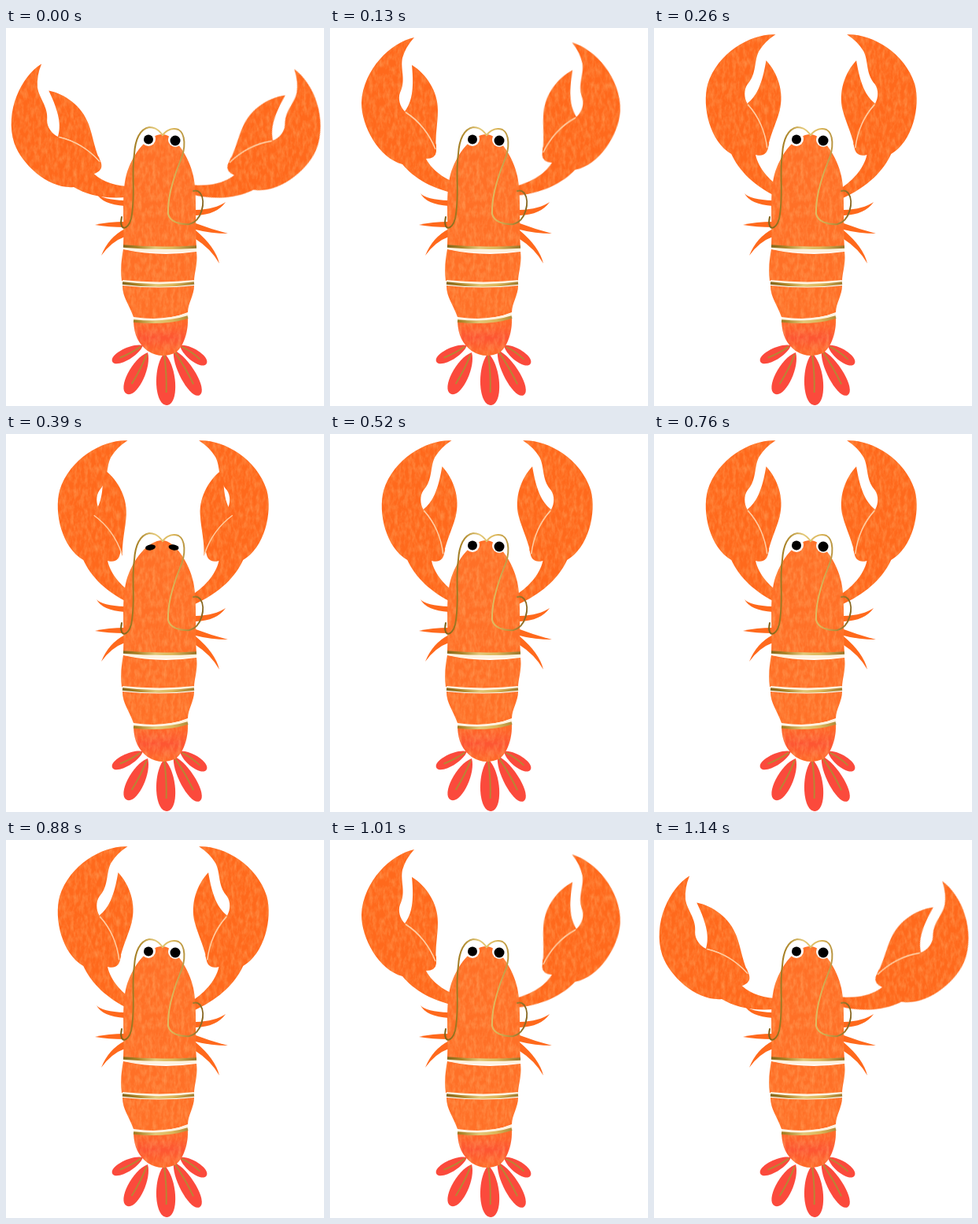
Write an HTML page that moves like this. It is 404 px wide and 480 px high and loops after 1.27 s.

```html
<!DOCTYPE html>
<html lang="en">
<head>
<meta charset="utf-8">
<title>Lobster</title>
<style>
html, body { margin: 0; width: 100%; height: 100%; overflow: hidden; background: #fff; }
svg { display: block; width: 404px; height: 480px; }
</style>
</head>
<body>
<svg viewBox="0 0 404 480" fill="none">
  <defs>
    <linearGradient id="gold" gradientUnits="userSpaceOnUse" x1="145" y1="0" x2="252" y2="0">
      <stop offset="0" stop-color="#7d6018"/>
      <stop offset=".2" stop-color="#a98226"/>
      <stop offset=".42" stop-color="#e3c878"/>
      <stop offset=".62" stop-color="#dcb75a"/>
      <stop offset="1" stop-color="#80601a"/>
    </linearGradient>
    <linearGradient id="tail" gradientUnits="userSpaceOnUse" x1="0" y1="366" x2="0" y2="416">
      <stop offset="0" stop-color="#ff6f25"/>
      <stop offset=".55" stop-color="#fd5532"/>
      <stop offset="1" stop-color="#ff6c28"/>
    </linearGradient>
    <filter id="wash" filterUnits="userSpaceOnUse" x="0" y="0" width="404" height="480" color-interpolation-filters="sRGB">
      <feTurbulence type="fractalNoise" baseFrequency=".22 .1" numOctaves="3" seed="4"/>
      <feColorMatrix values="0 0 0 0 1  0 0 0 0 .78  0 0 0 0 .52  .7 0 0 0 -.26"/>
      <feComposite operator="in" in2="SourceAlpha"/>
      <feMerge><feMergeNode in="SourceGraphic"/><feMergeNode/></feMerge>
    </filter>
    <path id="palm" fill="#ff691c" d="M107 12C78 18 42 52 40 95C40 125 62 165 92 173C106 190 130 206 170 212V200C150 195 130 182 122 166Q134 166 135 157V148Q116 118 95 106C89 100 86 90 89 82C97 66 89 52 92 38Q96 24 107 12Z"/>
    <g id="thumb">
      <path fill="#ff691c" d="M104 47C122 58 137 80 137 104C137 122 133 138 135 157C127 132 110 114 95 106C104 94 107 78 104 47Z"/>
      <path stroke="#ffd0a6" stroke-width="1.5" d="M134 154Q122 124 96 107"/>
    </g>
  </defs>

  <g fill="#ff691c">
    <path d="M115 210Q122 218 151 219V226Q122 224 115 210Z"/>
    <path d="M113 250Q130 246 151 246V253Q130 253 113 250Z"/>
    <path d="M121 289Q130 266 151 255V265Q134 271 121 289Z"/>
    <path d="M279 221Q266 230 241 231V238Q268 237 279 221Z"/>
    <path d="M282 261Q262 256 241 248V256Q260 261 282 261Z"/>
    <path d="M271 299Q266 278 241 257V268Q260 280 271 299Z"/>
  </g>

  <g filter="url(#wash)">
    <g class="claw"><use href="#palm"/><use class="pincer" href="#thumb"/></g>
    <g transform="matrix(-1 0 0 1 404 0)">
      <g class="claw"><use href="#palm"/><use class="pincer" href="#thumb"/></g>
    </g>
  </g>

  <g id="fins"></g>

  <g filter="url(#wash)" fill="#ff7027">
    <path d="M199 135C215 136 233 164 238 188C243 212 240 250 242 278Q195 283 149 276C151 250 146 212 153 186C161 159 180 135 199 135Z"/>
    <path d="M149 281Q195 291 242 284C244 300 239 310 239 322Q195 327 147 321C145 305 147 292 149 281Z"/>
    <path d="M148 327Q195 332 239 327C239 340 231 349 231 361Q202 373 162 367C156 350 148 342 148 327Z"/>
    <path fill="url(#tail)" d="M162 373Q203 376 231 367C232 387 225 405 216 412Q197 421 180 410C168 401 163 390 162 373Z"/>
  </g>

  <g stroke="#fff2df" stroke-width="4">
    <path d="M150 279Q195 287 242 281"/>
    <path d="M148 322Q195 327 239 322"/>
    <path d="M162 370Q202 374 231 364"/>
  </g>
  <g stroke="url(#gold)" stroke-width="3.500">
    <path d="M149 277Q195 281 242 278"/>
    <path d="M148 324Q195 330 239 324"/>
    <path d="M162 372Q203 376 231 367"/>
  </g>

  <g id="open">
    <circle cx="181" cy="141" r="9" fill="#fff"/>
    <circle cx="215" cy="142" r="9" fill="#fff"/>
    <circle cx="181" cy="141.500" r="6" fill="#000"/>
    <circle cx="215" cy="143" r="6.500" fill="#000"/>
  </g>
  <g id="shut" fill="#000">
    <ellipse cx="183.500" cy="144" rx="6.500" ry="3.500" transform="rotate(-10 183.500 144)"/>
    <ellipse cx="213" cy="144" rx="6.500" ry="3.500" transform="rotate(10 213 144)"/>
  </g>

  <g stroke="url(#gold)" stroke-width="2" stroke-linecap="round">
    <path d="M199 136C192 127 187 126 182 126C170 128 164 142 163 160C159 185 165 215 159 242C155 258 143 258 147 240"/>
    <path d="M199 136C205 128 213 127 219 129C228 134 229 152 221 170C213 190 205 214 206 236C208 246 221 250 233 249C249 245 254 220 247 210Q243 205 238 207"/>
  </g>
</svg>
<script>
const $ = s => document.querySelector(s);
const claws = document.querySelectorAll('.claw');
const pincers = document.querySelectorAll('.pincer');

// Tail fins: base x, base y, angle, length, width
$('#fins').innerHTML = [
  [174, 403, 62, 44, 10],
  [180, 412, 27, 59, 14],
  [201, 413, -3, 66, 16],
  [213, 409, -30, 66, 13],
  [221, 403, -55, 41, 10]
].map(([x, y, a, l, w]) => `<g transform="translate(${x} ${y}) rotate(${a})">
  <path fill="#fb4a3c" d="M0 0C${w} ${l * .25} ${w} ${l} 0 ${l}C${-w} ${l} ${-w} ${l * .25} 0 0Z"/>
  <path stroke="#b98434" stroke-width="2" d="M0 3Q2 ${l * .4} 0 ${l * .76}"/></g>`).join('');

// Each claw: pivot x, pivot y, angle; the right one is mirrored
const wide = { arms: [[66, 138, -20], [65, 143, -24]], bite: 0 };
const mid = { arms: [[95, 106, 0], [91, 113, -4]], bite: 0 };
const up = { arms: [[118.5, 96, 15], [123, 96, 15]], bite: 0 };
const snap = { ...up, bite: -12 };

const steps = [
  [0, wide], [130, mid], [260, up], [390, snap], [510, up],
  [640, snap], [760, up], [1010, mid], [1140, wide]
];

let shown;
function draw(now) {
  const t = now % 1270;
  const pose = steps.findLast(([start]) => start <= t)[1];
  if (pose !== shown) {
    shown = pose;
    pose.arms.forEach(([x, y, a], i) => {
      claws[i].setAttribute('transform', `translate(${x} ${y}) rotate(${a}) translate(-95 -106)`);
      pincers[i].setAttribute('transform', `rotate(${pose.bite} 130 138)`);
    });
    $('#open').style.display = pose.bite ? 'none' : '';
    $('#shut').style.display = pose.bite ? '' : 'none';
  }
  requestAnimationFrame(draw);
}
draw(0);
</script>
</body>
</html>
```
